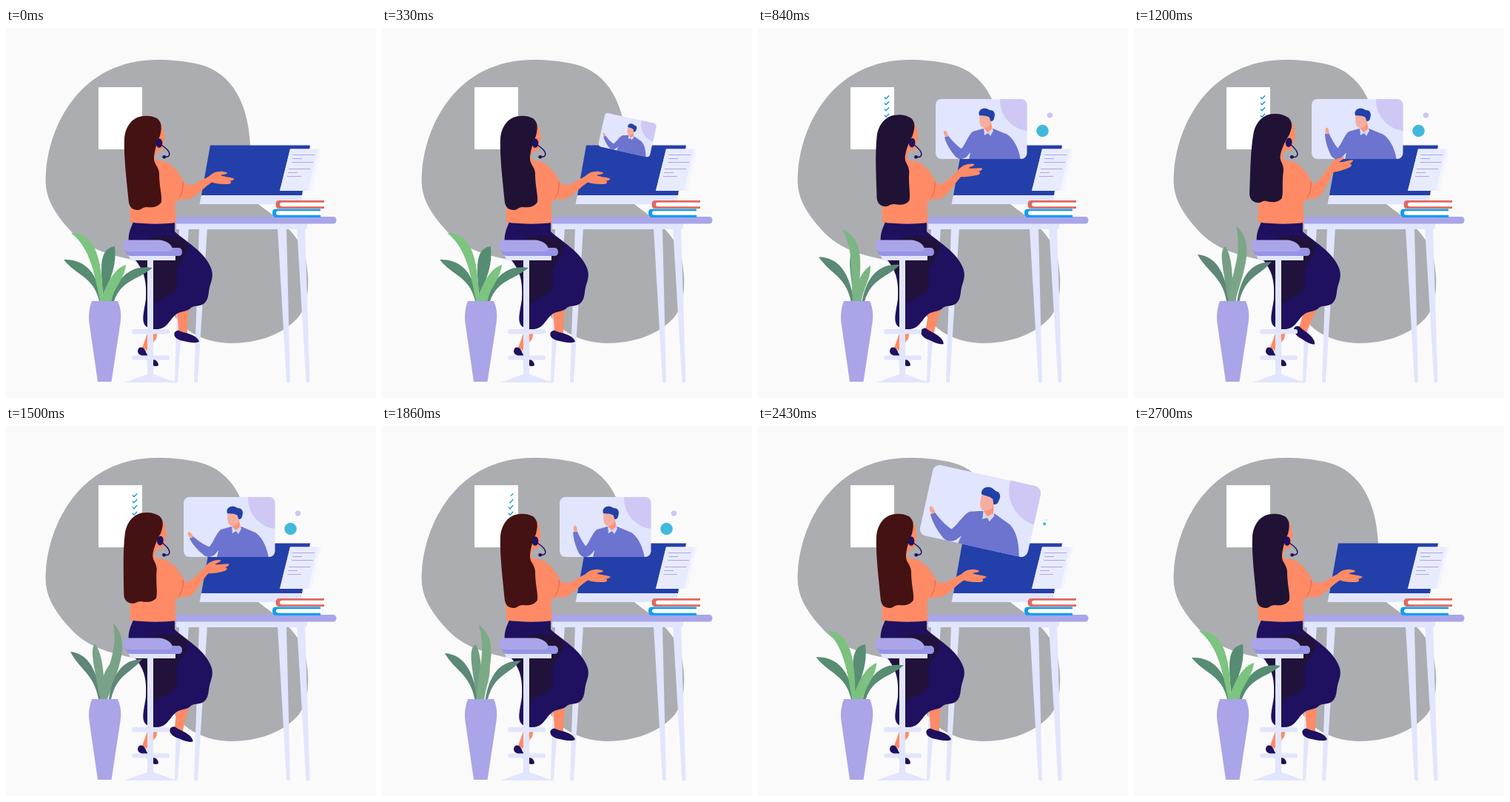
An HTML page that plays this animation: 500x500 px, repeating every 2730 ms.

```html
<!DOCTYPE html>
<html lang="en">
<head>
<meta charset="utf-8">
<title>Video call</title>
<style>
html, body { margin: 0; width: 100%; height: 100%; overflow: hidden; background: #fafafa; }
svg { display: block; width: 100%; height: 100%; }
</style>
</head>
<body>
<svg viewBox="0 0 500 500">
  <defs>
    <clipPath id="cardClip"><rect x="240" y="96" width="123.5" height="81" rx="8"/></clipPath>
  </defs>

  <path fill="#acadb1" d="M54 195C58 135 98 43 205 43C225 43 240 45 251 47C300 54 327 95 330 158C331 190 330 220 341 238C358 252 394 272 404 308C412 345 409 376 393 393C372 415 340 426 303 426C262 425 236 405 225 385C214 360 212 325 170 313C120 303 100 290 80 266C62 244 51 225 54 195Z"/>

  <path fill="#fff" d="M125 80H184V164H125Z"/>
  <g id="checks" fill="none" stroke="#149fd6" stroke-width="1.4"></g>

  <!-- desk -->
  <g fill="#e1e5fd">
    <path d="M234 270H247L232 478Q230 481 228 478Z"/>
    <path d="M261 270H272L259 478Q256 481 254 478Z"/>
    <path d="M367 270H379L384 478Q382 481 379 478Z"/>
    <path d="M393 270H404L410.500 478Q408 481 405.500 478Z"/>
    <path d="M230 262H407V269Q407 272 404 272H230Z"/>
  </g>
  <rect x="222" y="255" width="224.500" height="9.500" rx="4.500" fill="#a9a5e8"/>

  <!-- monitor -->
  <path fill="#233fa9" d="M276 158.500H411L400 226H264Z"/>
  <path fill="#e1e5fd" d="M264 226H400L397.500 238H261.500Z"/>
  <path fill="#f3f4fe" d="M384 163.500H426L413 220H370Z"/>
  <path fill="#e8ebfd" d="M384 163.500H422L408 220H370Z"/>
  <path fill="none" stroke="#a9a9e6" stroke-width="1.200" d="M387 171.500H417M387 176.500H400M386 181.500H415M382 190.500H411.500M381 195.500H394M380 200.500H399"/>

  <!-- books -->
  <path fill="#e0685c" d="M430 233H369Q364.500 233 364.500 238.500T369 244H430Z"/>
  <path fill="#fff" d="M430 235.700H373Q370 235.700 370 238.500T373 241.300H430Z"/>
  <path fill="#149cf0" d="M425 244.500H364Q360 244.500 360 250T364 256H425Z"/>
  <path fill="#fff" d="M425 247.200H368Q365 247.200 365 250T368 252.800H425Z"/>

  <!-- call window -->
  <g id="card">
    <g clip-path="url(#cardClip)">
      <path fill="#e1e5fd" d="M240 96H364V177H240Z"/>
      <circle cx="368" cy="98" r="41" fill="#cfc8f5"/>
      <path fill="#6c74cf" d="M304 136L290 140C284 145 281 156 275 163L268 172C270 178 276 178 282 174L287 168L285 178H355C352 162 346 150 337 144L318 136Z"/>
      <path id="forearm" fill="#6c74cf" d="M248 152L252.500 149C262 157 270 162 277 164L281 172C279 177 273 178 268 175C260 169 252 160 248 152Z"/>
      <path id="hand" fill="#f5a48f" d="M250.500 151.500L247.500 149.500C245.500 147 245 143.500 247 143C250 143.500 251 146.500 253 149Z"/>
      <path fill="#ff9276" d="M306 130L315 127L317 139L311 143L306 138Z"/>
      <path fill="#f4ae9f" d="M299.500 117C304 115 310 116 314 119L315 127C314 132 310 135.500 305 135C300 134.500 298.500 128 299.500 117Z"/>
      <path fill="#2140a8" d="M299 118C297 113 301 108.500 306 108.500C310 108 312 111 314 111C319 111 321 116 319.500 120C319 125 317 126 314.500 126L312.500 120.500C308 118 304 119 299 118Z"/>
      <path fill="#d3dbf4" d="M305 135.500L311 141L317 135.500L318 139L314 146L311 142L306 145Z"/>
    </g>
  </g>
  <g id="bubbles">
    <circle cx="384.500" cy="139" r="8.300" fill="#41b9dc"/>
    <circle cx="394.500" cy="118" r="3.700" fill="#cdc6f5"/>
  </g>

  <!-- woman -->
  <path fill="#ff8b66" d="M192 410L206 406L203 420L190 436L184 432Z"/>
  <path fill="#1f1060" d="M180 432C184 430 188 433 190 440C195 447 206 447 206 456C202 459 194 456 188 444C180 443 175 438 180 432Z"/>
  <g id="foot">
    <path fill="#ff8b66" d="M229 372H248C246 386 245 398 245 413L233 411C233 398 231 386 229 372Z"/>
    <path fill="#1f1060" d="M231 409C234 408 236 411 243 412C251 414 260 418 261 424C254 427 246 424 240 423C232 422 225 417 228 411Z"/>
  </g>
  <path fill="#1f1060" d="M172 262H228V275C242 288 266 301 275 320C281 331 279 338 276 347C273 356 275 366 268 372C262 377 256 374 250 378C244 384 238 382 231 386C224 391 220 400 214 404C206 409 194 408 189 403C182 396 187 382 189 366C190 345 188 332 178 318C168 304 162 290 168 272Z"/>
  <path fill="#20123a" d="M196 283C215 279 243 280 245 292C247 306 232 316 230 330C231 343 234 352 224 359C214 363 210 371 190 371C191 345 190 330 178 314L186 300Z"/>
  <path fill="none" stroke="#20123a" stroke-width=".8" d="M178 273C195 277 210 276 226 275"/>
  <path fill="#ff8b66" d="M196 178L213 180C226 184 234 196 241 208C243 218 240 228 236 232L229 234C228 244 229 254 230 263C210 265.500 188 265 168 262.500C167 245 169 235 166 215C162 208 161 195 164 185Z"/>
  <g id="arm">
    <path fill="#ff8b66" d="M238 207C244 213 250 213 256 210.500L275 200C281 194 290 192 299 195.500C299 198 294 197.500 290 199C296 202 303 201 308.500 203.500C308 206 304 206.500 302 206.500C306 208 304 211 300 211C293 211 286 211 278 208.500C268 215 259 226 249 230.500C241 234 233 230 232 223Z"/>
  </g>
  <path fill="none" stroke="#d96550" stroke-width="1" d="M239 208C240 216 238 223 234 229"/>
  <g id="head">
    <path fill="#ff8b66" d="M203 126C210 128 213 134 213 141C215 147 216 151 213 152C213 158 213 164 210 165C206 166 202 168 201.500 173C202 179 206 181 208 183L196 186Z"/>
    <path id="hair" d="M186 119C170 120 161 134 160 150C159 175 163 205 165.500 232C166 243 172 246 178 246C183 246 184 242 190 242C198 243 206 242 210 235C211 225 207 215 207 196C206 186 199 184 200 174C201 164 205 152 208 146C210 138 212 128 204 122C198 119 192 118 186 119Z"/>
    <ellipse cx="207" cy="155.500" rx="4.300" ry="6.300" fill="#1f1060"/>
    <path fill="none" stroke="#1f1060" stroke-width="1.500" d="M210 158C217 163 222 167 220.500 172Q219 175 214 174"/>
    <ellipse cx="213.800" cy="174.300" rx="2.500" ry="2.300" fill="#1f1060"/>
  </g>

  <!-- stool -->
  <g fill="#e1e5fd">
    <path d="M166 306H229V314H170Q166 312 166 306Z"/>
    <path d="M191 313H199V468L231 479H160L191 468Z"/>
    <rect x="170" y="407" width="51" height="6.500" rx="3"/>
    <rect x="170" y="442.500" width="51" height="6" rx="3"/>
  </g>
  <path fill="#9794e4" d="M160 297H234Q238 298 238 303T233 308H168Q161 306 160 297Z"/>
  <path fill="#a9a5e8" d="M163 286.500H206C216 287 222 291 225 297.500C225 301 222 302 218 302H164C157 300 156 288 163 286.500Z"/>

  <!-- plant -->
  <g id="plant"></g>
  <path fill="#a9a5e8" d="M116 369H151C156 381 156 390 154 402L142.500 478H124L113 402C111 390 112 380 116 369Z"/>
</svg>

<script>
const LOOP = 2730, STEP = 30, FIRST = 180;
const $ = id => document.getElementById(id);
const mix = (a, b, k) => a + (b - a) * k;
const ease = k => (1 - Math.cos(Math.PI * k)) / 2;
const ramp = (t, from, to) => Math.min(1, Math.max(0, (t - from) / (to - from)));

// value at t from [time, value] pairs, eased between them
function track(t, keys) {
  for (let i = 1; i < keys.length; i++) {
    const [t0, a] = keys[i - 1], [t1, b] = keys[i];
    if (t < t1) return mix(a, b, ease(ramp(t, t0, t1)));
  }
  return keys[keys.length - 1][1];
}

function add(parent, attrs) {
  const el = document.createElementNS('http://www.w3.org/2000/svg', 'path');
  for (const name in attrs) el.setAttribute(name, attrs[name]);
  return parent.appendChild(el);
}

const set = (id, transform) => $(id).setAttribute('transform', transform);
const grow = (x, y, s, deg = 0) =>
  `translate(${x} ${y}) rotate(${deg}) scale(${s}) translate(${-x} ${-y})`;

const checks = [94, 102, 110, 118.5].map(y =>
  add($('checks'), { d: `M171 ${y - .5}l2 2.300 4.200-4.600`, pathLength: 1 }));

// colours at rest and swayed
const LIGHT = [[124, 196, 127], [122, 162, 136]];
const DARK = [[86, 140, 114], [95, 134, 120]];
const MIDDLE = [DARK[0], LIGHT[1]];
// each leaf: colours, resting shape, swayed shape
const leaves = [
  [DARK, 'M78 313C106 312 124 330 130 369L126 369C118 335 95 335 78 313Z',
         'M87 305C112 308 123 330 129 369L125 369C119 335 100 330 87 305Z'],
  [MIDDLE, 'M147 295C122 298 130 335 131 360L133 367C140 335 150 325 147 295Z',
           'M120 295C112 302 121 330 126 365L133 367C133 335 130 305 120 295Z'],
  [LIGHT, 'M88 277C118 277 130 305 131 369L127 369C118 320 110 295 88 277Z',
          'M145 266C166 290 158 315 137 369L129 369C134 325 152 310 145 266Z'],
  [DARK, 'M198 324C170 320 150 335 142 369L146 369C156 340 180 340 198 324Z',
         'M184 315C160 316 145 330 139 369L142 369C150 335 168 335 184 315Z'],
  [LIGHT, 'M162 320C145 325 134 350 128 369L142 369C146 350 160 340 162 320Z',
          'M140 322C130 335 128 350 127 369L137 369C139 350 143 340 140 322Z']
].map(([colors, rest, sway]) => ({
  colors, rest, sway: sway.match(/\d+/g).map(Number), el: add($('plant'), {})
}));

function drawPlant(k) {
  for (const { colors: [from, to], rest, sway, el } of leaves) {
    let i = 0;
    el.setAttribute('d', rest.replace(/\d+/g, n => mix(+n, sway[i++], k).toFixed(2)));
    el.setAttribute('fill', `rgb(${from.map((c, j) => Math.round(mix(c, to[j], k)))})`);
  }
}

function drawChecks(t) {
  checks.forEach((el, i) => {
    const end = ramp(t, 480 + 25 * i, 680 + 25 * i);
    const start = ramp(t, 1740 + 60 * i, 1980 + 60 * i);
    el.style.display = end > start ? '' : 'none';
    el.setAttribute('stroke-dasharray', `0 ${start} ${end - start} 2`);
  });
}

function draw(t) {
  drawPlant(track(t, [[280, 0], [1470, 1], [2640, 0]]));
  drawChecks(t);

  const size = track(t, [[180, 0], [490, 1.22], [690, 1], [2280, 1], [2430, 1.21], [2670, 0]]);
  const tilt = track(t, [[540, 12.5], [690, 0], [2280, 0], [2430, 12.5]]);
  set('card', grow(360, 172, size, tilt));
  set('bubbles', grow(388, 130, track(t, [[440, 0], [660, 1], [2310, 1], [2490, 0]])));

  const wave = track(t, [[600, 0], [1140, 27], [1500, 0], [1920, 27], [2340, 0]]);
  set('forearm', `rotate(${wave} 273 170)`);
  set('hand', `rotate(${wave} 273 170)`);

  const lean = track(t, [[400, 0], [1270, 1], [1830, 0]]);
  set('head', `translate(${2 * lean} 0) rotate(${8 * lean} 213 157)`);
  set('hair', `translate(${-2 * lean} ${5 * lean}) scale(1 ${1 - .037 * lean})`);
  set('arm', `rotate(${-23.4 * lean} 240 222)`);
  set('foot', `rotate(${track(t, [[400, 0], [1170, 21], [1830, 0]])} 243 380)`);

  const darkHair = t >= 270 && t < 1350 || t >= 2580;
  $('hair').setAttribute('fill', darkHair ? '#201235' : '#441212');
}

let begin;
function tick(now) {
  begin ??= now;
  const t = (now - begin) % LOOP;
  draw(t < FIRST ? 0 : Math.floor(t / STEP) * STEP);
  requestAnimationFrame(tick);
}
draw(0);
requestAnimationFrame(tick);
</script>
</body>
</html>
```
